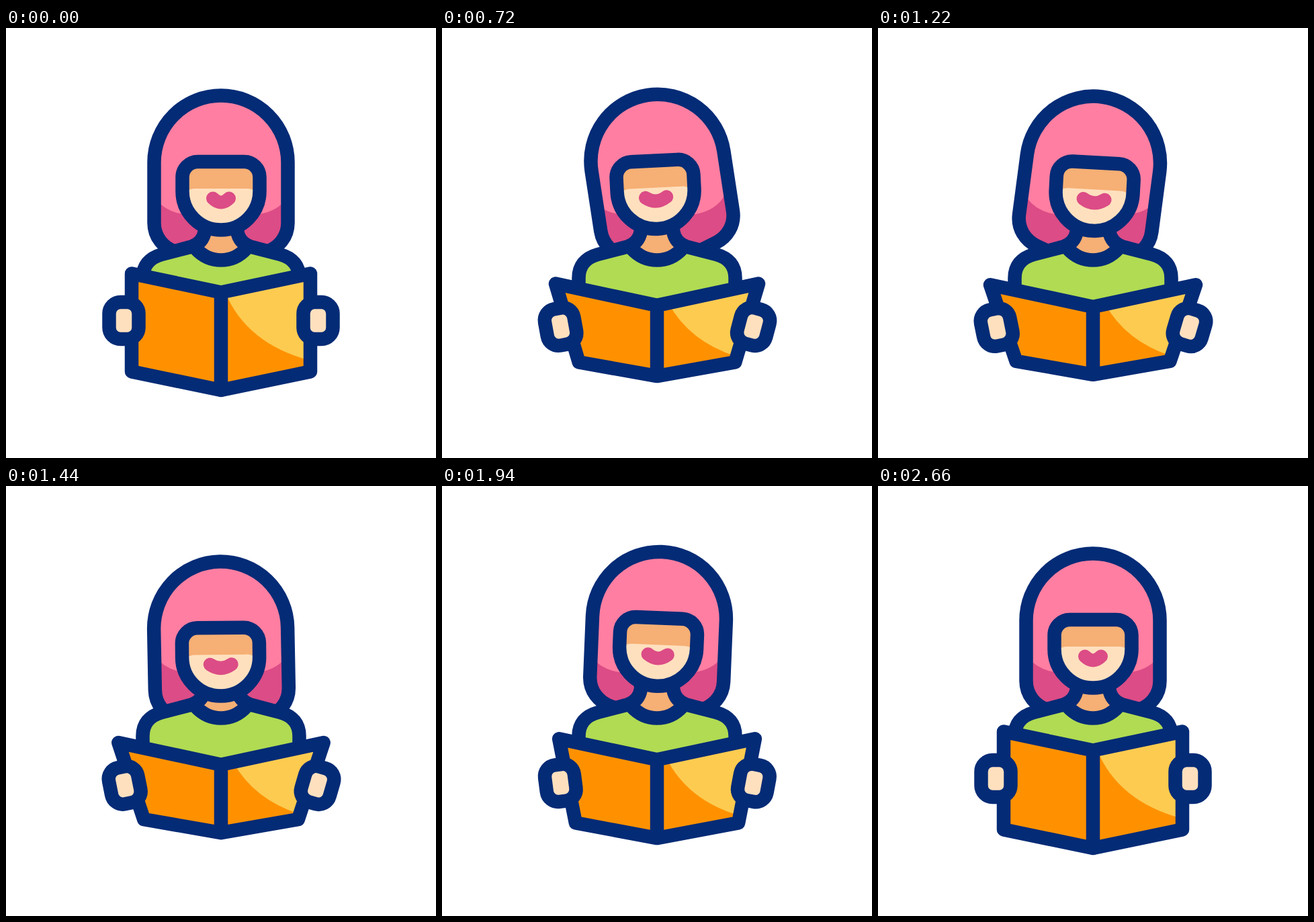
An HTML page for the animation above (3.02 s loop, 640x640 px).

```html
<!DOCTYPE html>
<html lang="en">
<head>
<meta charset="utf-8">
<title>Reader</title>
<style>
  html, body { margin: 0; width: 100%; height: 100%; overflow: hidden; background: #fff; }
  svg { display: block; width: 100%; height: 100%; }
  .line { fill: none; stroke: #042b76; stroke-width: 20.5; stroke-linecap: round; stroke-linejoin: round; }
  .skin { fill: #ffe0be; }
  .shadow { fill: #f6af74; }
</style>
</head>
<body>
<svg viewBox="0 0 640 640">
  <defs>
    <path id="hairShape" d="M220.500 290V200a99.500 99.500 0 0 1 199 0V290C419.500 312 405 327 388 333L350 345H290L252 333C235 327 220.500 312 220.500 290Z"/>
    <path id="faceShape" d="M262.500 222a23 23 0 0 1 23 -23H354.500a23 23 0 0 1 23 23V243a57.500 57.500 0 0 1 -115 0Z"/>
    <rect id="handShape" x="-22" y="-27.500" width="44" height="55" rx="17"/>
    <clipPath id="hairClip"><use href="#hairShape" class="hair"/></clipPath>
  </defs>

  <use href="#hairShape" class="hair" fill="#ff7ea1"/>
  <g clip-path="url(#hairClip)">
    <path fill="#dc4c86" d="M190 205L215 240Q228 274 270 278H370Q412 274 425 240L450 205V380H190Z"/>
  </g>
  <use href="#hairShape" class="hair line"/>

  <path class="shadow" d="M296 280V302Q293 320 282 327Q298 345.500 320 345.500T358 327Q347 320 344 302V280Z"/>
  <path fill="#b0db52" d="M203.500 420V372Q203.500 345 232 337L282 326Q298 345.500 320 345.500T358 326L408 337Q436.500 345 436.500 372V420Z"/>
  <path class="line" d="M203.500 420V372Q203.500 345 232 337L276 325.500Q293 320 296 302V296M436.500 420V372Q436.500 345 408 337L364 325.500Q347 320 344 302V296M282 328Q298 345.500 320 345.500T358 328"/>

  <g id="face">
    <use href="#faceShape" class="skin"/>
    <path class="shadow" d="M268 204H372V244Q367 239 358 239H282Q273 239 268 244Z"/>
    <path id="lips" fill="none" stroke="#dc4c86" stroke-width="20" stroke-linecap="round"/>
    <use href="#faceShape" class="line"/>
  </g>

  <path id="cover" fill="#ff9100"/>
  <path id="shine" fill="#fdcb50"/>
  <path id="edges" class="line"/>

  <g id="left"><use href="#handShape" class="skin"/><use href="#handShape" class="line"/></g>
  <g id="right"><use href="#handShape" class="skin"/><use href="#handShape" class="line"/></g>
</svg>
<script>
const LOOP = 3020, STEP = 20, END = 2660;
const WIDEST = 1220, CLOSING = 1070;
const $ = id => document.getElementById(id);
const hair = document.querySelectorAll('.hair');

// Swings from rest through [time, value] turning points and back to rest.
function swing(t, ...turns) {
  let [t0, v0] = [0, 0];
  for (const [t1, v1] of [...turns, [END, 0]]) {
    if (t < t1) return v0 + (v1 - v0) * (1 - Math.cos(Math.PI * (t - t0) / (t1 - t0))) / 2;
    [t0, v0] = [t1, v1];
  }
  return 0;
}

const bob = t => swing(t, [460, 12], [955, -13], [1440, 12], [1940, -2.7]);
const headTilt = t => swing(t, [550, -4], [1200, 3.1], [1670, -4], [1950, 2.4]);
const hairTilt = t => swing(t, [720, -8.7], [1200, 7.6], [1670, -9.2], [1950, 2.4]);

function openness(t) {
  const u = (t - WIDEST) / (t < WIDEST ? WIDEST : CLOSING);
  return Math.max(0, 1 - Math.abs(u) ** 2.6);
}

function drawHead(t, p) {
  const tilt = headTilt(t);
  const head = `translate(0 ${bob(t)}) rotate(${tilt} 320 282)`;
  $('face').setAttribute('transform', head);
  hair.forEach(el => el.setAttribute('transform', `${head} rotate(${hairTilt(t) - tilt} 320 150)`));

  const w = 12 + 4 * p;
  $('lips').setAttribute('d', `M${320 - w} 253.5Q320 ${265.5 - p} ${320 + w} 253.5`);
}

function drawBook(p) {
  const tx = 133 + 20 * p, ty = 365.5 + 16.7 * p;
  const bx = 133 - 18.5 * p, by = 511.4 - 15.5 * p;
  const top = 393.5 + 21.5 * p, base = 539 - 23.2 * p;
  const outline = `M${320 - tx} ${ty}L320 ${top}L${320 + tx} ${ty}` +
    `L${320 + bx} ${by}L320 ${base}L${320 - bx} ${by}Z`;
  $('cover').setAttribute('d', outline);
  $('edges').setAttribute('d', `${outline}M320 ${top}V${base}`);
  $('shine').setAttribute('d', `M${326 + 12 * p} ${393 + 18 * p}` +
    `Q${358 + 11 * p} ${470 - 4 * p} ${453 - 17 * p} ${495 - 7 * p}L${320 + tx} ${ty}Z`);
}

function placeHand(id, x, y, angle) {
  $(id).setAttribute('transform', `translate(${x} ${y}) rotate(${angle})`);
}

function draw(t) {
  const p = openness(t);
  drawHead(t, p);
  drawBook(p);
  placeHand('left', 175.5 + 1.2 * p, 435.5 + 10 * p, -11.5 * p);
  placeHand('right', 464.5 - p, 435.5 + 10 * p, 16.5 * p);
}

const start = performance.now();
function tick() {
  const t = (performance.now() - start) % LOOP;
  draw(Math.floor(t / STEP) * STEP);
  requestAnimationFrame(tick);
}
tick();
</script>
</body>
</html>
```
